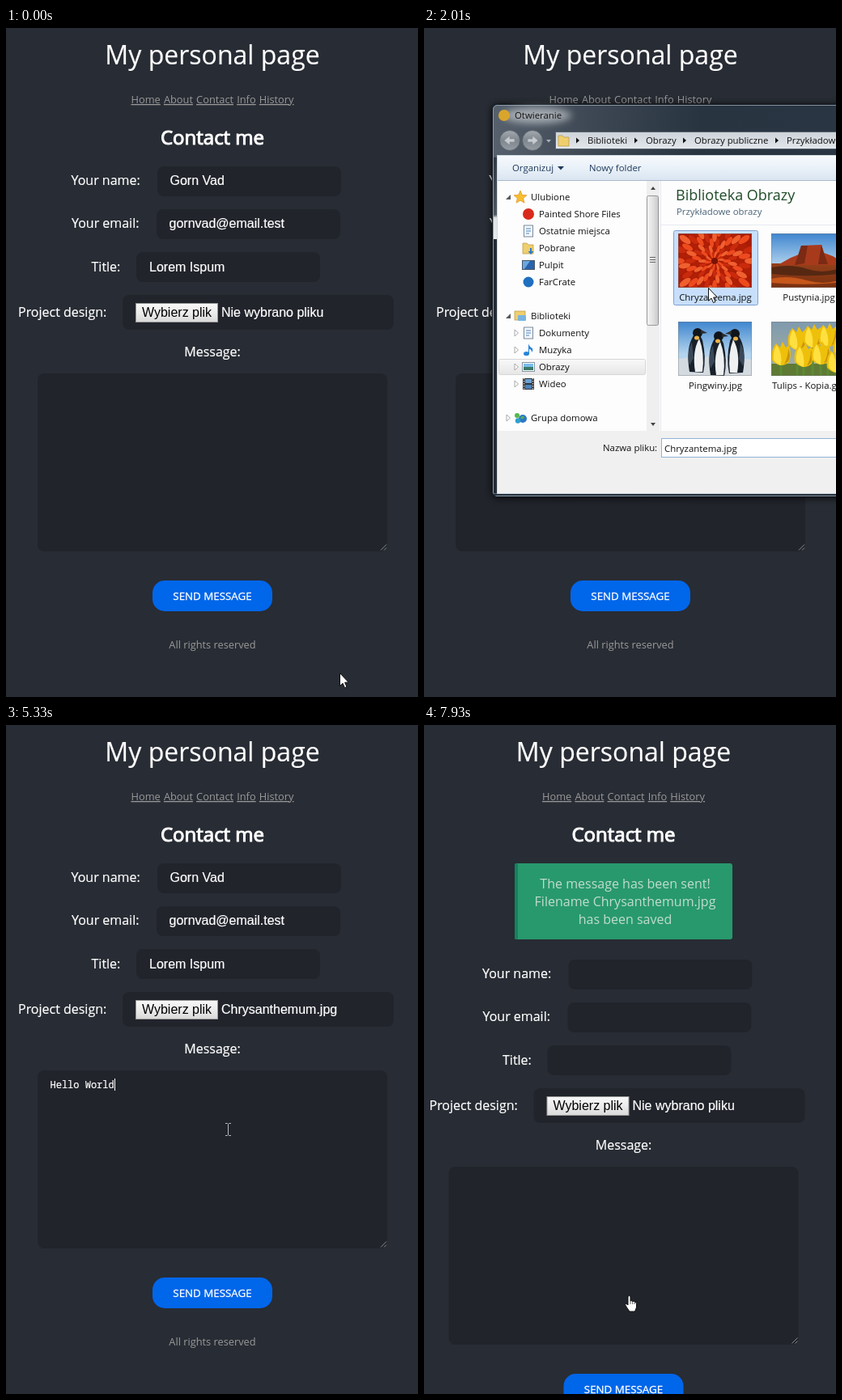
Animation of 509 by 827 pixels, one loop 8 s. Source, as an HTML page:

```html
<!DOCTYPE html>
<html lang="en">
<head>
<meta charset="utf-8">
<title>Contact form</title>
<style>
  html, body { margin: 0; width: 509px; height: 827px; overflow: hidden; background: #282c34; }
  svg { position: absolute; left: 0; top: 0; }
  text { font: 16px "Open Sans", sans-serif; fill: #fff; white-space: pre; }
  #page text { stroke: #fff; stroke-width: .2px; }
  #page .mid { text-anchor: middle; }
  .mid { text-anchor: middle; }
  #page .title { font-size: 32px; }
  #page .head { font-size: 24px; stroke-width: 1.1px; }
  #page .link { font-size: 12.8px; fill: #999; stroke: none; text-decoration: underline; }
  #page .foot { font-size: 12.8px; fill: #999; stroke: none; }
  #page .send { font-size: 13.333px; stroke-width: .3px; }
  .val { font-family: "Liberation Sans", Arial, sans-serif; }
  #page .dark { fill: #000; stroke: none; }
  #page .code { font: 500 12px "Noto Sans Mono", monospace; }
  #page .note { fill: #c0dccf; stroke: none; }
  .ui { font-size: 11.4px; fill: #111; }
  .lib { font-size: 18px; fill: #1e4b28; }
  .sub { fill: #4a6478; }
  .bar { fill: #1e395b; }
  #dialog { transform-origin: 545px 262px; }
</style>
</head>
<body>
<script>
const rect = (x, y, w, h, fill, more = '') =>
  `<rect x="${x}" y="${y}" width="${w}" height="${h}" fill="${fill}" ${more}/>`;
const text = (x, y, s, cls = '', more = '') => `<text x="${x}" y="${y}" class="${cls}" ${more}>${s}</text>`;
const path = (d, fill, more = '') => `<path d="${d}" fill="${fill}" ${more}/>`;
const circle = (x, y, r, fill, more = '') => `<circle cx="${x}" cy="${y}" r="${r}" fill="${fill}" ${more}/>`;
const oval = (x, y, rx, ry, fill, more = '') =>
  `<ellipse cx="${x}" cy="${y}" rx="${rx}" ry="${ry}" fill="${fill}" ${more}/>`;
const group = (id, body, more = '') => `<g id="${id}" ${more}>${body}</g>`;
const at = (x, y, body, flip = 1) => `<g transform="translate(${x} ${y}) scale(${flip} 1)">${body}</g>`;
const ramp = (id, stops, across) => `<linearGradient id="${id}" x2="${across ? 1 : 0}" y2="${across ? 0 : 1}">` +
  stops.map(([o, c]) => `<stop offset="${o}" stop-color="${c}"/>`).join('') + '</linearGradient>';
const range = n => [...Array(n).keys()];

// Web page
const field = (x, y, w, h) => rect(x, y, w, h, '#21242b', 'rx="8"');
const links = ['Home', 'About', 'Contact', 'Info', 'History'];

const page = group('page',
  text(255, 45, 'My personal page', 'title mid') +
  text(255, 93, links.map(s => `<tspan class="link">${s}</tspan>`).join(' '), 'mid') +
  text(255, 144, 'Contact me', 'head mid') +
  group('alert',
    rect(120.5, 171, 269, 94, '#28996c', 'rx="3"') + rect(120.5, 171, 4, 94, '#16805f', 'rx="1.5"') +
    ['The message has been sent!', 'Filename Chrysanthemum.jpg', 'has been saved']
      .map((s, i) => text(257, 202 + 22 * i, s, 'note mid')).join('')) +
  group('form',
    text(80.5, 194, 'Your name:') + field(187, 171, 227, 37) +
    text(81, 247, 'Your email:') + field(186, 224, 227, 37) +
    text(105.5, 301, 'Title:') + field(161, 277, 227, 37) +
    group('values', text(202.5, 194, 'Gorn Vad', 'val') + text(201.5, 247, 'gornvad@email.test', 'val') +
      text(177, 301, 'Lorem Ispum', 'val')) +
    text(15, 357, 'Project design:') + field(144, 330, 335, 43) +
    rect(160.5, 340.5, 101, 23, 'url(#btn)', 'id="pick" stroke="#999"') +
    text(168, 357, 'Wybierz plik', 'val dark') + text(266, 357, '', 'val', 'id="file"') +
    text(255, 406, 'Message:', 'mid') + field(39, 427, 432, 220) +
    path('M463 645.5l7-7M467 645.5l3-3', 'none', 'stroke="#8a8c90"') +
    text(54.5, 449, '', 'code', 'id="msg"') + rect(55, 437, 1, 15, '#fff', 'id="caret"') +
    rect(181, 683, 148, 38, '#0066ea', 'rx="15"') + text(255, 707, 'SEND MESSAGE', 'send mid') +
    text(255, 767, 'All rights reserved', 'foot mid')));

// Tree icons, centred on 0,0
const paper = rect(-5.5, -7, 11, 14, '#f4f7fa', 'stroke="#7b8a99"');
const globe = circle(3, 1, 5, '#2b78c4') + path('M0 0q3-4 5-1q-2 4-5 1', '#59b34d');
const folder = path('M-7-6h5l2 2h6V7H-7Z', '#efcf6d', 'stroke="#b8923a" stroke-width=".7"');
const icons = {
  star: path('M0-8L2.3-2.7 8-2.2 3.7 1.6 5 7.2 0 4.2-5 7.2-3.7 1.6-8-2.2-2.3-2.7Z', '#f7bd2e', 'stroke="#d8962a" stroke-width=".7"'),
  red: circle(0, 0, 7, '#d9291c'),
  blue: circle(0, 0, 6.5, '#1f6fbf'),
  doc: paper + path('M-3-3h6M-3 0h6M-3 3h4', 'none', 'stroke="#4b86c2"'),
  folder: folder + path('M2 0v4h-2.5L3 8l3.5-4H4V0Z', '#2a7bd0'),
  screen: rect(-7.5, -5.5, 15, 11, '#2a62ad', 'stroke="#4b5663"') + path('M-7-5h9L-5 5h-2Z', '#6aa7e0'),
  shelf: rect(-7, -6, 13, 11, '#efcf6d', 'stroke="#b8923a" stroke-width=".7"') + rect(-3, -1, 10, 7, '#78b5e0', 'rx="1"'),
  music: oval(-2.5, 4.5, 3.5, 2.6, '#2784d8') + path('M0 5V-8q1 4 5 6q1 3-1 5q0-4-3-4V5Z', '#2784d8'),
  pic: rect(-7.5, -5.5, 15, 11, '#fff', 'stroke="#8494a4"') + rect(-6, -4, 12, 5, '#79bde8') + rect(-6, 0, 12, 4, '#3c7a68'),
  film: rect(-7, -7, 14, 14, '#2d333b') + rect(-4, -6, 8, 5, '#6aa0d2') + rect(-4, 1, 8, 5, '#4b82b9') +
    path('M-5.5-7V7M5.5-7V7', 'none', 'stroke="#ddd" stroke-width="1.3" stroke-dasharray="1.5 1.5"'),
  team: globe + circle(-4, -3, 3, '#57b84c') + circle(-3, 3.5, 3.2, '#2f9ed0'),
  pc: rect(-5, -6, 12, 9, '#3675b8', 'stroke="#5b6570"') + rect(-2, 4, 7, 2, '#6c757e') + rect(-8, -3, 3, 9, '#a9b2ba'),
  disk: rect(-8, -2, 16, 7, '#b9bfc4', 'rx="2.5" stroke="#777f86"') + rect(3, 1, 3, 1.5, '#4ab848'),
  sys: rect(-8, 0, 16, 6, '#b9bfc4', 'rx="2" stroke="#777f86"') + rect(-5, -7, 8, 6, '#d98a35'),
  net: rect(-8, -5, 9, 8, '#4384c4', 'stroke="#5b6570"') + globe
};

// label, row, level, icon, arrow: 0 none, 1 closed, 2 open
const tree = [
  ['Ulubione', 0, 0, 'star', 2], ['Painted Shore Files', 1, 1, 'red', 0], ['Ostatnie miejsca', 2, 1, 'doc', 0],
  ['Pobrane', 3, 1, 'folder', 0], ['Pulpit', 4, 1, 'screen', 0], ['FarCrate', 5, 1, 'blue', 0],
  ['Biblioteki', 7, 0, 'shelf', 2], ['Dokumenty', 8, 1, 'doc', 1], ['Muzyka', 9, 1, 'music', 1],
  ['Obrazy', 10, 1, 'pic', 1], ['Wideo', 11, 1, 'film', 1], ['Grupa domowa', 13, 0, 'team', 1],
  ['Komputer', 15, 0, 'pc', 2], ['RAMDisk (B:)', 16, 1, 'disk', 1], ['Dysk lokalny (C:)', 17, 1, 'sys', 1],
  ['Chata (D:)', 18, 1, 'disk', 1], ['Praca (F:)', 19, 1, 'disk', 1], ['Sieć', 21, 0, 'net', 1]
];
const arrows = ['', path('M-2-4l4.5 4-4.5 4Z', '#fff', 'stroke="#a0a0a0" stroke-width=".9"'), path('M3-3v6h-6Z', '#595959')];
const treeRows = tree.map(([s, row, level, icon, arrow]) => at(10 * level, 209 + 21 * row,
  at(104, 0, arrows[arrow]) + at(119, 0, icons[icon]) + text(132, 4, s, 'ui'))).join('');

// Flat pictures, 91 by 67
const reds = ['#c92a0c', '#ee4a1e', '#b01f06', '#f0602f'];
const petals = range(6).map(r => range(20).map(i =>
  oval(0, -45 + r * 7.5, 3.8 - r * .45, 8 - r * .7, reds[(i * 3 + r) % 4],
    `transform="translate(45 34) rotate(${i * 18 + r * 9})"`)).join('')).join('');
const bird = (x, y, flip) => at(x, y,
  path('M-9 25Q-14-4-4-20Q3-24 7-14Q12 8 8 26Z', '#18202a') + path('M-2 25Q-6 0 3-16Q10 2 7 25Z', '#eef0f1') +
  oval(1, -23, 6, 6, '#10151b') + path('M5-27l8 4-8 1Z', '#2a2a2a') + oval(0, -17, 3, 2.5, '#e8b04a') +
  path('M-6-12Q-13 2-9 17L-4 8Z', '#3a4858'), flip);
const tulip = (x, y) => at(x, y,
  path('M0 8V60', 'none', 'stroke="#5d8a35" stroke-width="3"') +
  path('M-11 5Q-13-8-6-16L-1-11 2-18 6-11 10-14Q14-3 10 7Q0 16-11 5Z', '#eec00c') +
  path('M-9 4Q-10-7-5-14Q2-4 0 11Q-6 9-9 4Z', '#ffe040') + path('M4 10Q9 0 9-10Q13 0 9 6Z', '#c9930a'));
const photo = (x, y, body) => at(x, y, `<g clip-path="url(#photo)">${body}</g>` +
  rect(.5, .5, 90, 66, 'none', 'stroke="#777" stroke-opacity=".4"'));
const photos =
  photo(314, 254, rect(0, 0, 91, 67, '#a81c08') + petals + circle(45, 34, 4, '#7c1205')) +
  photo(429, 254, rect(0, 0, 91, 67, 'url(#sky)') + rect(0, 37, 91, 30, 'url(#sand)') +
    path('M8 39L24 30 34 26 37 15 62 14 65 24 76 28 91 37V39Z', '#a83a1c') +
    path('M37 15l8 0-4 22-12 2ZM62 14l-4 24h12L65 24Z', '#7b2a14') +
    path('M0 42q25-5 45 2t46-3v8q-40 6-91 1Z', '#562812') + path('M0 56q20-5 44 2T91 55v5q-45 5-91 1Z', '#c7571b')) +
  photo(314, 363, rect(0, 0, 91, 67, 'url(#sky)') + path('M0 46q40-6 91 1V67H0Z', '#d4dbe0') +
    bird(23, 37, 1) + bird(49, 41, 1) + bird(71, 38, -1)) +
  photo(429, 363, rect(0, 0, 91, 67, 'url(#haze)') + rect(0, 52, 91, 15, '#5f7a35') +
    tulip(32, 24) + tulip(51, 21) + tulip(70, 20) + tulip(12, 43) + tulip(88, 33) + tulip(40, 45) + tulip(61, 42) + tulip(80, 52));

// File dialog
const crumb = (x, s) => path(`M${x - 14} 135.5l4 3.5-4 3.5Z`, '#111') + text(x, 143, s, 'ui');
const round = (x, flip) => circle(x, 139, 12.5, 'url(#round)', 'stroke="#59616a"') +
  at(x, 139, path('M-7 0L0-6v4h6v4H0v4Z', '#c6cbd0', 'stroke="#858d94" stroke-width=".7"'), flip);

const dialog =
  rect(84, 95, 922, 486, '#000', 'rx="7" opacity=".8" filter="url(#blur)"') +
  rect(84.5, 94.5, 921, 485, 'url(#glass)', 'rx="6" stroke="#10151b"') +
  rect(85.5, 95.5, 919, 483, 'none', 'rx="5" stroke="#a9b8c6" stroke-opacity=".7"') +
  rect(86, 160, 4, 101, 'url(#shine)') + rect(86, 261, 4, 314, '#222b36') + rect(86, 576, 918, 2, '#26313d') +
  oval(140, 108, 42, 10, '#fff', 'opacity=".5" filter="url(#blur)"') +
  circle(99, 108, 7, '#d9a52c') + text(112, 112, 'Otwieranie', 'ui') +
  round(106, 1) + round(134, -1) + path('M151 138h6l-3 3.5Z', '#aab1b8') +
  rect(162.5, 128.5, 830, 21, 'url(#addr)', 'stroke="#59636d"') + at(173, 139, folder) +
  crumb(202, 'Biblioteki') + crumb(274, 'Obrazy') + crumb(334, 'Obrazy publiczne') + crumb(448, 'Przykładowe obrazy') +
  rect(90, 157, 910, 419, '#cfd8e0') + rect(91, 158, 908, 417, '#f0f0f0') +
  rect(91, 158, 908, 31, 'url(#tools)') + rect(91, 188, 908, 1, '#a9b9cb') +
  text(109, 177, 'Organizuj', 'ui bar') + path('M165 171h8l-4 4.5Z', '#1e395b') + text(204, 177, 'Nowy folder', 'ui bar') +
  rect(91, 189, 908, 309, '#fdfdfd') +
  `<g clip-path="url(#pane)">` + group('tree',
    rect(92.5, 409.5, 181, 19, 'url(#row)', 'rx="2" stroke="#d6d6d6"') +
    rect(92.5, 514.5, 181, 19, '#e9f3fd', 'id="focus" rx="2" stroke="#93c2ee"') + treeRows) + '</g>' +
  rect(275, 189, 16, 309, '#efefef') + path('M280 200h6l-3-4ZM280 488h6l-3 4Z', '#444') +
  group('thumb', rect(275.5, 207.5, 14, 160, 'url(#thumbFill)', 'rx="2" stroke="#979797"') +
    path('M279 283.5h7M279 286.5h7M279 289.5h7', 'none', 'stroke="#666"')) +
  rect(292, 189, 1, 309, '#e4e8ee') +
  text(311, 213, 'Biblioteka Obrazy', 'lib') + text(312, 231, 'Przykładowe obrazy', 'ui sub') +
  rect(293, 243, 706, 1, '#e6e9f0') +
  rect(308.5, 250.5, 104, 92, '#c8dffb', 'id="chosen" rx="2" stroke="#7da2ce"') + photos +
  text(360, 337, 'Chryzantema.jpg', 'ui mid') + text(475.5, 337, 'Pustynia.jpg', 'ui mid') +
  text(360, 446, 'Pingwiny.jpg', 'ui mid') + text(430, 446, 'Tulips - Kopia.gif', 'ui') +
  text(221, 523, 'Nazwa pliku:', 'ui') + rect(293.5, 507.5, 600, 23, '#fff', 'stroke="#8fb4d6"') +
  text(297, 524, '', 'ui', 'id="name"') + rect(297, 511, 1, 16, '#000', 'id="nameCaret"');

const defs = `<defs>
  ${ramp('btn', [[0, '#f8f8f8'], [.5, '#ececec'], [1, '#d9d9d9']])}
  ${ramp('glass', [[0, '#56616d'], [.13, '#3d4854'], [.28, '#293441'], [1, '#2b3847']], 1)}
  ${ramp('shine', [[0, '#303a45'], [.7, '#4d5762'], [.74, '#dfe3e6'], [1, '#e8ebed']])}
  ${ramp('addr', [[0, '#cdd3da'], [1, '#e3e7ec']])}
  ${ramp('round', [[0, '#a3a9af'], [.5, '#7f878e'], [1, '#959ca3']])}
  ${ramp('tools', [[0, '#f7fafd'], [.5, '#e8f0f8'], [1, '#dae5f1']])}
  ${ramp('row', [[0, '#f9f9f9'], [1, '#e6e6e6']])}
  ${ramp('thumbFill', [[0, '#f4f4f4'], [.5, '#e2e2e2'], [1, '#c9c9cb']], 1)}
  ${ramp('sky', [[0, '#3f86cf'], [.6, '#b4d4ee']])}
  ${ramp('sand', [[0, '#93401a'], [1, '#7a3010']])}
  ${ramp('haze', [[0, '#7f9aae'], [1, '#a9b3a0']])}
  <filter id="blur" x="-20%" y="-100%" width="140%" height="300%"><feGaussianBlur stdDeviation="5"/></filter>
  <clipPath id="photo">${rect(0, 0, 91, 67, '#000')}</clipPath>
  <clipPath id="pane">${rect(91, 189, 184, 309, '#000')}</clipPath>
</defs>`;

const ink = 'stroke="#111" stroke-width="1" stroke-linejoin="round"';
const pointers =
  group('arrow', path('M.5 .5V16.3L4 13 6.5 18.6 9 17.5 6.6 12H11.3Z', '#fff', ink)) +
  group('beam', path('M-3.5-7.5h2.5l1 1 1-1h2.5M0-6.5v13M-3.5 7.5h2.5l1-1 1 1h2.5', 'none', 'stroke="#bbb"')) +
  group('hand', at(-5, 0,
    path('M4 12V2a1.5 1.5 0 0 1 3 0v5l1.5-.3 1.3.9 1.5-.2 1 1 1.7.3.5 1.5V15l-2 5H6L2.5 15 .5 11.5q1-1.6 2.6-.2z', '#fff', ink) +
    path('M7 7v4M9.7 8v3M12.2 9v2', 'none', 'stroke="#333" stroke-width=".8"')));

const layer = (id, w, body) => `<svg id="${id}" width="${w}" height="827">${body}</svg>`;
document.body.innerHTML = layer('site', 509, defs + page) + layer('dialog', 1010, dialog) + layer('pointer', 509, pointers);

// Timeline
const LOOP = 8000;
const bursts = [[0], [70, 840, 11], [920], [1150, 1320, 3], [1380, 1910, 8], [2010, 2380, 5], [2540, 2840, 5],
  [3010, 3070, 2], [3530], [3990], [4160, 4250, 2], [4400, 4480, 2], [4630, 4710, 2], [4860], [5010, 5090, 2],
  [5240, 5330, 2], [5730, 5880, 3], [6430], [6810, 7290, 7], [7520, 7930, 6]];
const ticks = bursts.flatMap(([a, b = a, n = 1]) => range(n).map(i => a + (n > 1 ? (b - a) * i / (n - 1) : 0)));
const keys = ticks.filter(t => t >= 4160 && t <= 5330).concat(6430);
const route = [[0, 412, 797], [840, 224, 344], [920, 234, 346], [1150, 236, 347], [1320, 241, 352], [1380, 241, 352],
  [1910, 351, 321], [2460, 351, 321], [2840, 274, 500], [3010, 280, 503], [3070, 274, 500], [5650, 274, 500],
  [5880, 230, 590], [6740, 230, 590], [6810, 223, 609], [7290, 253, 705], [LOOP, 253, 705]];

const el = id => document.getElementById(id);
const show = (id, on) => { el(id).style.display = on ? '' : 'none'; };
const put = (id, s) => { if (el(id).textContent !== s) el(id).textContent = s; };
const clamp = v => Math.max(0, Math.min(1, v));
const within = (v, a, b) => v >= a && v < b;

function pointerAt(t) {
  const i = Math.max(1, route.findIndex(k => k[0] >= t));
  const [a, x0, y0] = route[i - 1], [b, x1, y1] = route[i];
  const p = (t - a) / (b - a), e = p * p * (3 - 2 * p);
  return [x0 + (x1 - x0) * e, y0 + (y1 - y0) * e];
}

function drawPointer(t) {
  const [x, y] = pointerAt(t).map(Math.round);
  const kind = t >= 7290 || within(y, 683, 721) && within(x, 181, 329) ? 'hand'
    : within(y, 427, 647) && within(x, 39, 471) ? 'beam' : 'arrow';
  for (const id of ['arrow', 'beam', 'hand']) show(id, id === kind);
  el(kind).setAttribute('transform', `translate(${kind === 'beam' ? x + .5 : x} ${y})`);
  const hover = within(x, 160, 262) && within(y, 340, 364);
  el('pick').setAttribute('stroke', hover ? '#777' : '#999');
}

function drawDialog(t) {
  const open = t < 2010 ? clamp(.3 + (t - 1150) / 340) : clamp(1 - (t - 2010) / 330);
  const on = within(t, 1150, 2340), k = 1 - open;
  show('dialog', on);
  if (!on) return;
  el('dialog').style.opacity = open;
  el('dialog').style.transform = k ? `perspective(1500px) rotateX(${-13.5 * k}deg) scale(${1 - .13 * k}, ${1 - .115 * k})` : 'none';
  const low = t < 1500, chosen = t >= 2000;
  el('tree').setAttribute('transform', `translate(0 ${low ? -177 : 0})`);
  el('thumb').setAttribute('transform', `translate(0 ${low ? 100 : 0})`);
  show('focus', low);
  show('chosen', t >= 1900);
  el('chosen').setAttribute('opacity', chosen ? 1 : .5);
  show('nameCaret', !chosen);
  put('name', chosen ? 'Chryzantema.jpg' : '');
}

function drawPage(t) {
  const sent = t >= 7520, typed = keys.filter(k => t >= k - .01).length;
  el('page').setAttribute('transform', `translate(${sent ? -8.5 : 0} 0)`);
  el('form').setAttribute('transform', `translate(0 ${sent ? 119 : 0})`);
  el('alert').setAttribute('opacity', clamp((t - 7520) / 410));
  show('values', !sent);
  put('file', within(t, 2090, 7520) ? 'Chrysanthemum.jpg' : 'Nie wybrano pliku');
  put('msg', sent ? '' : 'Hello World!'.slice(0, typed));
  const off = within(t, 3530, 3990) || within(t, 5730, 6430) || t >= 6960;
  show('caret', t >= 3010 && !off);
  el('caret').setAttribute('x', Math.floor(55 + 7.2 * typed));
}

function frame() {
  const now = performance.now() % LOOP;
  const t = ticks.findLast(k => k <= now);
  drawPage(t);
  drawDialog(t);
  drawPointer(t);
  requestAnimationFrame(frame);
}
frame();
</script>
</body>
</html>
```
